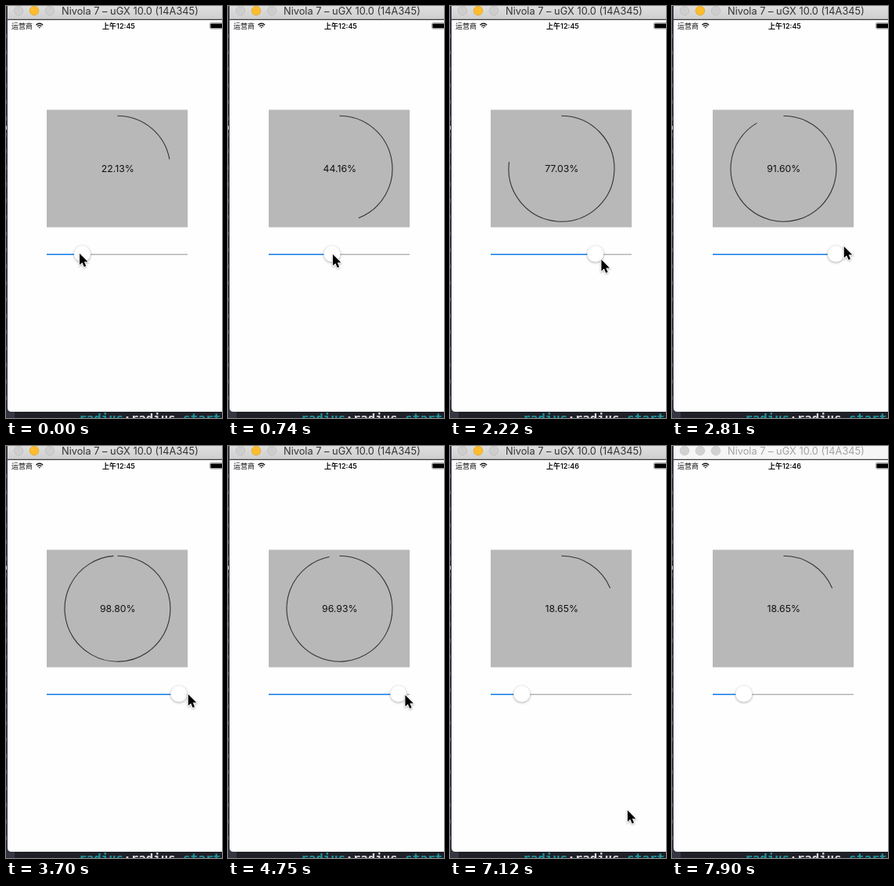
Animation of 276x526 px, one loop 8 s. Source, as an HTML page:

```html
<!DOCTYPE html>
<html>
<head>
<meta charset="utf-8">
<style>
  html, body { margin: 0; width: 100%; height: 100%; overflow: hidden; background: #1f2028; }
  svg { display: block; font-family: Inter, "Noto Sans CJK SC", "Noto Sans CJK", sans-serif; }
  .code { font: bold 15.8px "DejaVu Sans Mono", monospace; fill: #1b939b; }
  #knob { filter: drop-shadow(0 1.5px 1.5px rgba(0, 0, 0, .3)); }
  #cursor { filter: drop-shadow(0 1px 1px rgba(0, 0, 0, .3)); paint-order: stroke; }
  #title { font-size: 12.8px; fill: #333; }
  #bar { fill: url(#active); }
  .light { fill: #cecece; stroke: #bababa; stroke-width: .7; }
  .minimize { fill: #fdbd2d; stroke: #dfa023; }
  .inactive #bar { fill: #f6f6f6; }
  .inactive #title { fill: #a2a2a2; }
  .inactive .light { fill: #d2d2d2; stroke: #c4c4c4; }
</style>
</head>
<body>
<svg id="stage" width="276" height="526" viewBox="0 0 276 526">
  <defs>
    <linearGradient id="active" x2="0" y2="1">
      <stop stop-color="#dedede"/><stop offset="1" stop-color="#cfcfcf"/>
    </linearGradient>
  </defs>

  <!-- editor behind the window -->
  <path d="M0 0H11V526H0Z" fill="#353641"/>
  <path d="M.5 36V510" stroke="#5c5d68" stroke-dasharray="5 16"/>
  <path d="M.5 153v5" stroke="#ddd"/>
  <text class="code" x="93.2" y="531.5">radius<tspan fill="#d8d8d8">:radius</tspan> start</text>

  <!-- simulator window -->
  <path d="M2 17H276V518H7Q2 518 2 513Z" fill="#fefefe"/>
  <path id="bar" d="M2 0H276V17H2Z"/>
  <path d="M2 17.3H276" stroke="#3c3c3e" stroke-width="1.2"/>
  <circle class="light" cx="16" cy="6" r="5.8"/>
  <circle class="light minimize" cx="36" cy="6" r="5.8"/>
  <circle class="light" cx="56" cy="6" r="5.8"/>
  <text id="title" x="71" y="11">Nivola 7 – uGX 10.0 (14A345)</text>

  <!-- status bar -->
  <text x="7" y="28.7" font-size="9" fill="#111">运营商</text>
  <g fill="none" stroke="#111" stroke-width="1.3">
    <path d="M38.4 24.2Q42.8 20.4 47.2 24.2M40.2 26Q42.8 23.7 45.4 26"/>
    <path d="M41.4 26.9H44.2L42.8 28.6Z" fill="#111" stroke="none"/>
  </g>
  <text id="clock" x="144" y="28.7" font-size="9" font-weight="600" text-anchor="middle" fill="#111"></text>
  <rect x="260.5" y="21.5" width="20" height="7.6" rx="1.6" fill="#fff" stroke="#8a8a8a" stroke-width=".8"/>
  <rect x="261.4" y="22.4" width="20" height="5.8" rx=".8"/>

  <!-- progress view -->
  <path d="M52 132.5H232.2V282.5H52Z" fill="#b8b8b8"/>
  <path id="arc" fill="none" stroke="#333" stroke-width="1.1"/>
  <text id="label" x="142.8" y="212.3" font-size="12.3" text-anchor="middle" fill="#111"></text>

  <!-- slider -->
  <path d="M52 317.2H232" stroke="#b5b5b5" stroke-width="1.5"/>
  <path id="track" stroke="#1b84ee" stroke-width="1.5"/>
  <circle id="knob" cy="316.4" r="10.6" fill="#fff" stroke="#000" stroke-opacity=".1" stroke-width=".4"/>

  <path id="cursor" d="M0 0V14.6L3.4 11.5L5.8 17L8.2 16L5.9 10.6H10.5Z" stroke="#fff" stroke-width="1.8"/>
</svg>
<script>
const LOOP = 8000, STEP = 148.2;
const TURN = 31, RELEASE = 45, GONE = 51, CLOCK_TICK = 36, BLUR = 7895;
const $ = id => document.getElementById(id);
const easeOut = (u, power) => 1 - (1 - u) ** power;

// key points of the drag: [step, percent, cursor y]
const drag = [
  [0, 22.13, 316], [10, 66.19, 318], [16, 79.2, 325], [19, 91.6, 307], [25, 98.8, 317],
  [28, 98.8, 317], [30, 100, 318], [32, 96.93, 318], [39, 35.86, 326], [43, 18.65, 328]
];

function dragAt(step) {
  const n = drag.findIndex(k => k[0] > step);
  if (n < 0) return drag.at(-1).slice(1);
  const a = drag[n - 1], b = drag[n];
  const u = (step - a[0]) / (b[0] - a[0]);
  return [1, 2].map(i => a[i] + (b[i] - a[i]) * u);
}

function arcPath(percent) {
  const cx = 142.5, cy = 207.7, r = 67.5;
  const angle = Math.min(percent / 100, .9999) * 2 * Math.PI;
  const x = cx + r * Math.sin(angle), y = cy - r * Math.cos(angle);
  return `M${cx} ${cy - r}A${r} ${r} 0 ${+(percent > 50)} 1 ${x} ${y}`;
}

function draw() {
  const t = performance.now() % LOOP;
  const step = Math.floor((t + 8) / STEP);
  const [percent, dragY] = dragAt(step);
  const knobX = 61.8 + 1.611 * percent;

  // the pointer runs a little faster than the knob, then leaves downwards
  const leave = Math.min(Math.max((step - RELEASE) / (GONE - RELEASE), 0), 1);
  const x = 54 + 1.81 * percent - (step > TURN ? 3 : 0) + 157 * easeOut(leave, 3.4);
  const y = dragY + 212 * easeOut(leave, 1.5);

  $("arc").setAttribute("d", arcPath(percent));
  $("label").textContent = percent.toFixed(2) + "%";
  $("track").setAttribute("d", `M52 317.2H${knobX}`);
  $("knob").setAttribute("cx", knobX);
  $("cursor").setAttribute("transform", `translate(${x} ${y})`);
  $("clock").textContent = step < CLOCK_TICK ? "上午12:45" : "上午12:46";
  $("stage").classList.toggle("inactive", t >= BLUR);
  requestAnimationFrame(draw);
}
draw();
</script>
</body>
</html>
```
